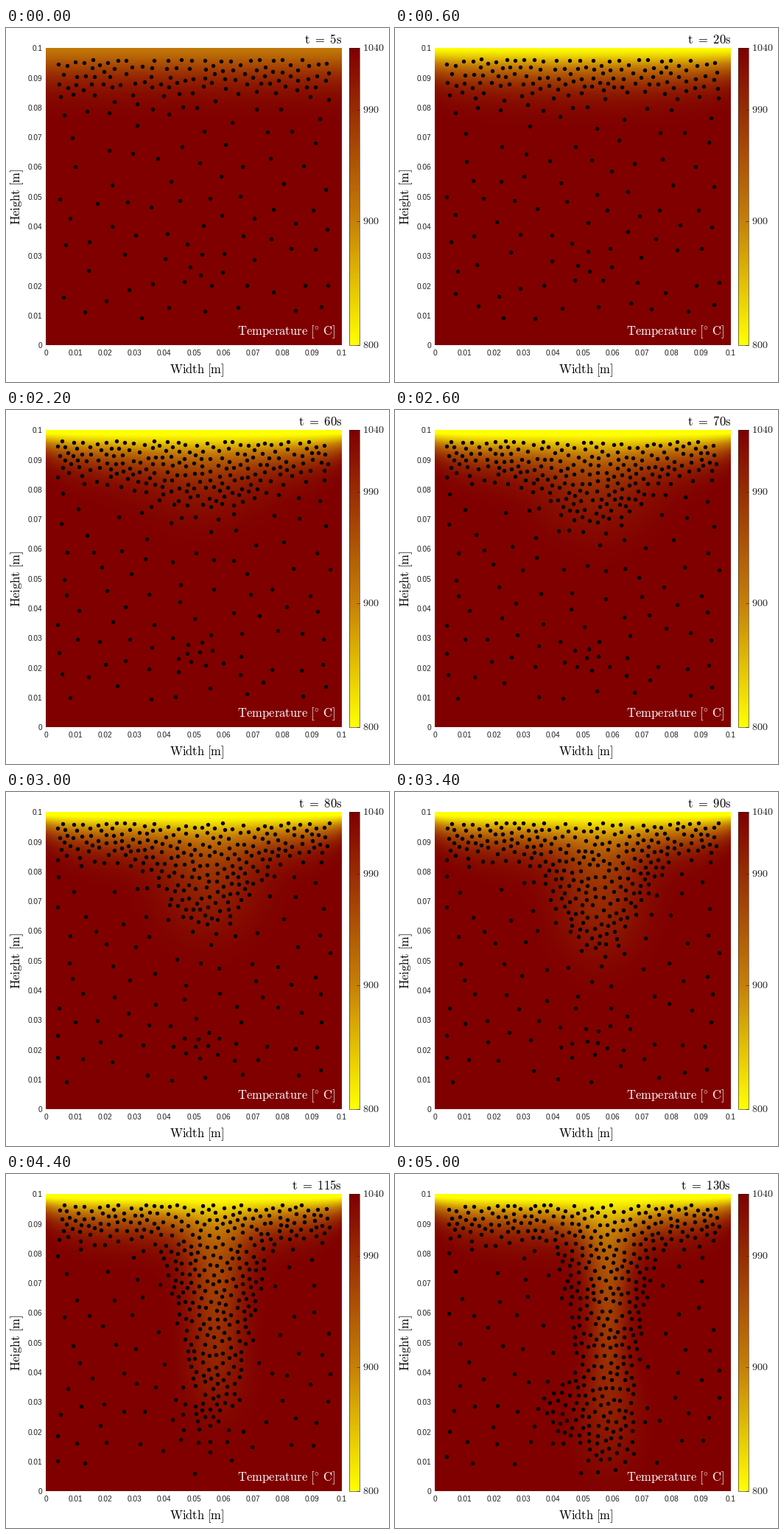
Recreate the animation shown at these times as a matplotlib script. Size 520 by 480 pixels, loop 5200 ms.

```python
import numpy as np
import matplotlib.pyplot as plt
from matplotlib.animation import FuncAnimation
from matplotlib.colors import LinearSegmentedColormap

W, H, DPI = 520, 480, 100
FRAMES, INTERVAL, STEP = 26, 200, 5
LEFT, RIGHT, TOP, BOTTOM = 54, 456, 27, 430
SIZE = 0.1                       # side of the tank in metres
INK = "#202020"

plt.rcParams["mathtext.fontset"] = "cm"


def pt(px):
    return px * 72 / DPI


def progress(t):
    return (t - STEP) / (STEP * (FRAMES - 1))


def settle(t, tau):
    return 1 - np.exp(-(t - STEP) / tau)


def centre(t):
    return .05 + .0085 * progress(t)


# --- temperature -----------------------------------------------------------

def cooling(x, depth, t):
    """Share of the way from 1040 (0) down to 800 degrees (1)."""
    p = progress(t)
    wall = np.exp(-np.minimum(x, SIZE - x) / .011)
    scale = .0092 * (1 - .42 * settle(t, 25) * wall)
    layer = (.55 + .53 * settle(t, 8)) * np.exp(-(depth / scale) ** 1.5)

    front = .012 + .076 * p ** 2.2
    width = .03 - .0245 * p + .014 * p ** 3 * np.exp(-depth / .013)
    width = width + .004 * p ** 8 / (1 + np.exp((.062 - depth) / .005))
    plume = .6 * p ** 1.3 * np.exp(-depth / .055 - ((x - centre(t)) / width) ** 2)
    plume = plume / (1 + np.exp((depth - front) / .006))
    return 1 - (1 - np.clip(layer, 0, 1)) * (1 - plume)


# --- crystals --------------------------------------------------------------

def reach(x, t):
    """Depth of the crowded zone below the lid."""
    p = progress(t)
    off = np.abs(x - centre(t))
    bump = .072 * p ** 2.3 * np.exp(-(off / (.03 - .0185 * p)) ** (2 + p))
    neck = .011 * p ** 6 * np.exp(-(off / .02) ** 2)
    return np.minimum(.0132 + bump + neck, .087)


def spacing(x, y, t):
    p = progress(t)
    below = SIZE - y - reach(x, t)
    head = np.hypot((x - .053) / .016, (y - .027) / .013) - p ** 8
    below = np.minimum(below, .012 * head + .001)
    near = .0028 - .00055 * settle(t, 12)
    far = .0094 + .0012 * p
    return near + (far - near) * np.clip(below / .013, 0, 1)


def clear(pts, x, y, gap):
    return not len(pts) or np.min((pts[:, 0] - x) ** 2 + (pts[:, 1] - y) ** 2) > gap * gap


def add(pts, xs, ys, t, rng):
    gaps = spacing(xs, ys, t)
    gaps *= 1 + np.where(gaps > .004, .32, .05) * rng.uniform(-1, 1, len(xs))
    inside = (xs > .004) & (xs < .096) & (ys > .009) & (ys < .0963)
    for x, y, gap in zip(xs[inside], ys[inside], gaps[inside]):
        if clear(pts, x, y, gap):
            pts = np.vstack([pts, (x, y)])
    return pts


def fill(pts, t, tries, rng):
    """Scatter new crystals, then pack more of them around the old ones."""
    pts = add(pts, rng.uniform(.004, .096, tries),
              .096 - .087 * rng.random(tries) ** 1.6, t, rng)
    for _ in range(2):
        seeds = np.repeat(pts, 6, axis=0)
        angle = rng.uniform(0, 2 * np.pi, len(seeds))
        r = rng.uniform(.0022, .0034, len(seeds))
        pts = add(pts, seeds[:, 0] + r * np.cos(angle),
                  seeds[:, 1] + r * np.sin(angle), t, rng)
    return pts


def drift(pts, t):
    x, y = pts.T
    depth = SIZE - y
    old, new = reach(x, t - STEP), reach(x, t)
    sink = (new - old) * np.minimum(depth / old, y / (SIZE - old))
    calm = np.clip(depth / .03, .15, 1) * STEP
    x = x + calm * .00010 * np.sin(2 * np.pi * (y / .06 + t / 160))
    y = y - sink + calm * (.00005 + .00008 * np.sin(2 * np.pi * (x / .045 - t / 180)))
    return np.column_stack([np.clip(x, .004, .096), np.clip(y, .0035, .0962)])


def thin(pts, t):
    kept = np.empty((0, 2))
    for (x, y), gap in zip(pts, spacing(*pts.T, t)):
        if clear(kept, x, y, max(.002, .5 * gap)):
            kept = np.vstack([kept, (x, y)])
    return kept


def history():
    rng = np.random.default_rng(12)
    states = [fill(np.empty((0, 2)), STEP, 2500, rng)]
    for i in range(1, FRAMES):
        t = STEP * (i + 1)
        states.append(fill(thin(drift(states[-1], t), t), t, 700, rng))
    return states


def to_px(pts):
    k = np.array([RIGHT - LEFT, TOP - BOTTOM]) / SIZE
    return pts * k + (LEFT, BOTTOM)


# --- stage -----------------------------------------------------------------

fig = plt.figure(figsize=(W / DPI, H / DPI), dpi=DPI, facecolor="white")
ax = fig.add_axes([0, 0, 1, 1])
ax.axis("off")

cmap = LinearSegmentedColormap.from_list(
    "heat", [(0, "#800000"), (.58, "#c67f08"), (1, "#ffff00")])


def picture(data, x0, x1):
    return ax.imshow(data, cmap=cmap, vmin=0, vmax=1, aspect="auto",
                     extent=(x0, x1, BOTTOM, TOP), interpolation="bilinear")


def line(xs, ys):
    ax.plot(xs, ys, color=INK, lw=pt(.6), solid_capstyle="butt", zorder=4)


def roman(x, y, body, px=16.6, **kw):
    kw = {"va": "baseline", "ha": "center", "color": "black", "zorder": 6, **kw}
    return ax.text(x, y, r"$\mathrm{%s}$" % body, fontsize=pt(px), **kw)


def clock_text(t):
    return r"t\ {=}\ %ds" % t


gx, gd = np.meshgrid((np.arange(201) + .5) / 201 * SIZE, (np.arange(403) + .5) / 403 * SIZE)
field = picture(cooling(gx, gd, STEP), LEFT, RIGHT)
picture(np.linspace(0, 1, 256)[:, None], 466, 480)
line([466, 480, 480, 466, 466], [TOP, TOP, BOTTOM, BOTTOM, TOP])

for n in range(11):
    px, py = to_px(np.array([n, n]) / 100)
    style = dict(family="Liberation Sans", fontsize=pt(10.1), color=INK, va="center_baseline")
    ax.text(px, 439.5, f"{n / 100:g}", ha="center", **style)
    ax.text(49.5, py + .3, f"{n / 100:g}", ha="right", **style)

for temp in (800, 900, 990, 1040):
    py = BOTTOM - (temp - 800) / 240 * (BOTTOM - TOP)
    line([476, 480], [py, py])
    roman(484, py + 4.2, temp, 14.2, ha="left", color=INK)

roman(259.5, 468, r"Width\ [m]")
roman(25.6, 228.5, r"Height\ [m]", rotation=90, ha="right", va="center")
roman(447.5, 416, r"Temperature\ [^{\circ}\ C]", 16.7, ha="right", color="white")
clock = roman(456, 21, clock_text(STEP), ha="right")

states = [to_px(p) for p in history()]
dots = ax.scatter(*states[0].T, s=pt(5.4) ** 2, c="black", linewidths=0, zorder=5)
ax.set_xlim(0, W)
ax.set_ylim(H, 0)


def update(i):
    t = STEP * (i + 1)
    field.set_data(cooling(gx, gd, t))
    dots.set_offsets(states[i])
    clock.set_text(r"$\mathrm{%s}$" % clock_text(t))
    return field, dots, clock


anim = FuncAnimation(fig, update, frames=FRAMES, interval=INTERVAL,
                     repeat=True, repeat_delay=0, blit=False)
plt.show()
```
